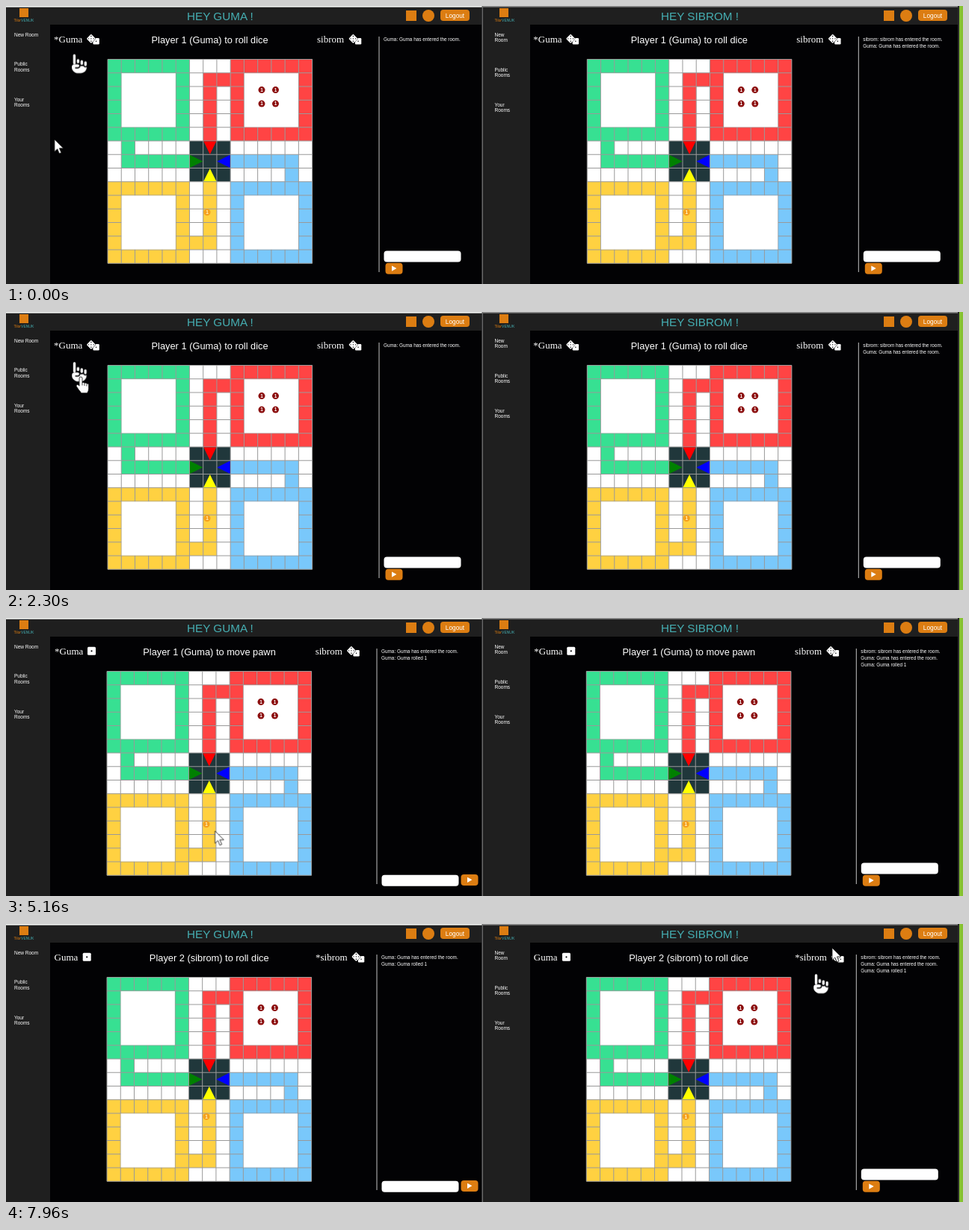
An HTML page for the animation above (8000 ms loop, 1280 by 373 pixels).

```html
<!DOCTYPE html>
<html lang="en">
<head>
<meta charset="utf-8">
<title>Board game in two windows</title>
<style>
html, body { margin: 0; width: 100%; height: 100%; overflow: hidden; background: #020204; }
svg { display: block; width: 1280px; height: 373px; font-family: Arial, "Liberation Sans", sans-serif; }
text { fill: #fff; white-space: pre; }
.teal { fill: #45aeb2; font-size: 15.25px; }
.menu { font-size: 6.5px; }
.log { font-size: 6.4px; }
.status { font-size: 12.83px; text-anchor: middle; }
.name { font: 13px "Times New Roman", "Liberation Serif", serif; }
.button { font-size: 8.3px; text-anchor: middle; }
.pip { font-size: 6.5px; font-weight: bold; text-anchor: middle; }

.roll, .move, .next, .news, .arrow, .finger { animation: 8s step-end infinite; }
.roll { animation-name: roll; }
.move { animation-name: move; }
.next { animation-name: next; }
.news { animation-name: news; }
.arrow { animation-name: arrow; }
.finger { animation-name: finger; }
@keyframes roll { 0% { opacity: 1 } 30.9%, 100% { opacity: 0 } }
@keyframes move { 0% { opacity: 0 } 30.9% { opacity: 1 } 87%, 100% { opacity: 0 } }
@keyframes next { 0% { opacity: 0 } 87%, 100% { opacity: 1 } }
@keyframes news { 0% { opacity: 0 } 31.7%, 100% { opacity: 1 } }
@keyframes arrow { 0% { opacity: 1 } 8.75% { opacity: 0 } 30.9% { opacity: 1 } 80.6% { opacity: 0 } 87.2%, 100% { opacity: 1 } }
@keyframes finger { 0% { opacity: 0 } 8.75% { opacity: 1 } 30.9% { opacity: 0 } 80.6% { opacity: 1 } 87.2%, 100% { opacity: 0 } }

.bounce { animation: bounce 1s cubic-bezier(.28, .84, .42, 1) -.371s infinite; }
.next .bounce { animation-delay: -.04s; }
@keyframes bounce {
  0%, 64%, 100% { transform: scale(1, 1) translateY(0) }
  10% { transform: scale(1.1, .9) translateY(0) }
  30% { transform: scale(.9, 1.1) translateY(-13px) }
  50% { transform: scale(1.05, .95) translateY(0) }
  57% { transform: scale(1, 1) translateY(-3.25px) }
}
.mouse { animation: mouse 8s linear infinite; }
@keyframes mouse {
  0% { transform: translate(65px, 179px) }
  2.8% { transform: translate(28px, 165px) }
  4.5% { transform: translate(2px, 145px) }
  6.5% { transform: translate(28px, 118px) }
  8.75% { transform: translate(85px, 86px) }
  10.4%, 14% { transform: translate(109px, 75px) }
  19.5%, 31.6% { transform: translate(100px, 87px) }
  37%, 40% { transform: translate(128px, 96px) }
  41.6% { transform: translate(275px, 308px) }
  43.5% { transform: translate(400px, 350px) }
  46% { transform: translate(600px, 362px) }
  49% { transform: translate(790px, 290px) }
  51.6%, 52.9% { transform: translate(845px, 221px) }
  56.25% { transform: translate(828px, 238px) }
  58.5% { transform: translate(720px, 335px) }
  60.5% { transform: translate(540px, 362px) }
  62.9% { transform: translate(287px, 292px) }
  67% { transform: translate(268px, 276px) }
  70% { transform: translate(261px, 270px) }
  73.2%, 77% { transform: translate(264px, 276px) }
  80.6%, 87.2% { transform: translate(264px, 278px) }
  90% { transform: translate(310px, 312px) }
  94% { transform: translate(620px, 298px) }
  97.2% { transform: translate(880px, 217px) }
  99.5%, 100% { transform: translate(1105px, 32px) }
}
</style>
</head>
<body>
<svg id="stage" viewBox="0 0 1280 373"></svg>
<script>
const ORANGE = '#dc7d12', CELL = 18.24;
const ONE = 'Guma', TWO = 'sibrom';

const rect = (x, y, w, h, fill, r = 0) =>
  `<rect x="${x}" y="${y}" width="${w}" height="${h}" rx="${r}" fill="${fill}"/>`;
const disc = (x, y, r, fill) => `<circle cx="${x}" cy="${y}" r="${r}" fill="${fill}"/>`;
const text = (x, y, cls, s) => `<text x="${x}" y="${y}" class="${cls}">${s}</text>`;
const path = (d, fill, more = '') => `<path d="${d}" fill="${fill}" ${more}/>`;
const group = (x, y, body, cls = '') => `<g class="${cls}" transform="translate(${x} ${y})">${body}</g>`;
const use = (id, x, y) => `<use href="#${id}" x="${x}" y="${y}"/>`;

const pawn = (x, y, fill, ink) => disc(x, y, 4.5, fill) +
  `<text x="${x}" y="${y + 2.3}" class="pip" style="fill:${ink}">1</text>`;

// Board in cell units: coloured blocks, grid, homes, goal triangles
function board() {
  const [g, r, b, y] = ['#37e092', '#ff4444', '#79c8fb', '#ffd141'];
  const blocks = [
    [0, 0, 6, 6, g], [1, 6, 1, 2, g], [2, 7, 4, 1, g],
    [9, 0, 6, 6, r], [7, 1, 2, 1, r], [7, 2, 1, 4, r],
    [9, 9, 6, 6, b], [9, 7, 5, 1, b], [13, 8, 1, 1, b],
    [0, 9, 6, 6, y], [7, 9, 1, 5, y], [6, 13, 1, 1, y],
    [6, 6, 3, 3, '#20373b']
  ];
  let lines = '';
  for (let i = 0; i <= 15; i++) lines += `M${i} 0V15M0 ${i}H15`;
  const homes = [[1, 1], [10, 1], [1, 10], [10, 10]];
  const cells = rect(0, 0, 15, 15, '#fff') +
    blocks.map(k => rect(...k)).join('') +
    path(lines, 'none', 'stroke="#999" stroke-width=".055"') +
    homes.map(([x, y]) => rect(x + .02, y + .02, 3.96, 3.96, '#fff')).join('') +
    path('M7.03 6.03h.94L7.5 6.98z', 'red') + path('M6.03 7.03v.94L6.98 7.5z', 'green') +
    path('M8.97 7.03v.94L8.02 7.5z', 'blue') + path('M7.03 8.97h.94L7.5 8.02z', 'yellow');
  let pawns = '';
  for (const x of [206, 224.5]) for (const y of [41, 59.5]) pawns += pawn(x, y, '#8b0d0d', '#fff');
  return `<g id="board"><g transform="scale(${CELL})">${cells}</g>${pawns}</g>`;
}

function dice() {
  const dots = [[96, 224], [224, 96], [224, 224], [224, 352], [352, 224], [480, 352]];
  return `<g id="dice"><g transform="scale(.0262)">${rect(320, 192, 320, 320, '#fff', 48)}
    <rect x="56" y="56" width="336" height="336" rx="50" transform="rotate(45 224 224)" fill="#fff" stroke="#020204" stroke-width="34" paint-order="stroke"/>
    ${dots.map(([x, y]) => disc(x, y, 28, '#020204')).join('')}</g></g>`;
}

const rolled = `<g id="rolled">${rect(0, 0, 11, 11, '#fff', 1.5)}${disc(5.5, 5.5, 1.1, '#020204')}</g>`;

const pointer = `<g id="pointer"><g transform="scale(.0508) translate(-192 -256)" fill="#fff">
  <path d="M64 32V240" stroke="#fff" stroke-width="64" stroke-linecap="round"/>
  <path d="M160 160v48M256 192v64M352 224v64" stroke="#fff" stroke-width="64" stroke-linecap="round"/>
  <path d="M224 312v-.6c9.4 5.4 20.3 8.6 32 8.6 13.2 0 25.4-4 35.6-10.8 8.7 24.9 32.5 42.8 60.4 42.8 11.7 0 22.6-3.1 32-8.6V352c0 88.4-71.6 160-160 160h-61.7c-42.4 0-83.1-16.9-113.1-46.9L37.5 453.5C13.5 429.5 0 396.9 0 363v-27c0-35.3 28.7-64 64-64h88c22.1 0 40 17.9 40 40s-17.9 40-40 40H96c-8.8 0-16 7.2-16 16s7.2 16 16 16h56c39.8 0 72-32.2 72-72z"/>
</g></g>`;
const hint = (x, y) => group(x, y, `<g class="bounce">${use('pointer', 0, 0)}</g>`);

const send = (x, y) => rect(x, y, 23, 15, ORANGE, 4) + path(`M${x + 8.5} ${y + 3.7}v7.2l6.4-3.6z`, '#fff');
const input = (x, y) => rect(x, y, 103, 15, '#fff', 4);

const menu = (x, rows) => rows.map(([y, s]) => text(x, y, 'menu', s)).join('');

// Header and sidebar of one window
function frame(x, titleX, title, toolX, rows) {
  return rect(x, 0, 636, 25, '#1f1f1f') + rect(x, 25, x ? 63 : 59, 348, '#1f1f1f') +
    rect(x + (x ? 22 : 18), 3, 12, 12, ORANGE) +
    `<text x="${x + (x ? 15.5 : 10.5)}" y="21" font-size="5px"><tspan fill="${ORANGE}">Tilor</tspan><tspan fill="#45aeb2">VENUK</tspan></text>` +
    text(titleX, 18.5, 'teal', title) +
    rect(toolX, 6, 14, 14, ORANGE) + disc(toolX + 30, 13, 8, ORANGE) +
    rect(toolX + 46, 5, 39, 15, ORANGE, 4) + text(toolX + 65.5, 15.6, 'button', 'Logout') +
    menu(x ? 653.5 : 11, rows);
}

// Changing part of one window, in the left window's coordinates
function scene(s, right) {
  const log = [`${ONE}: ${ONE} has entered the room.`];
  if (right) log.unshift(`${TWO}: ${TWO} has entered the room.`);
  const line = (m, i) => text(s.chat + 6.5, 47 + 9 * i, 'log', m);
  const wide = right || !s.roll;
  return use('board', s.board, 71.6) +
    pawn(s.board + 133, s.pawn, '#f5a01c', '#fff3c4') +
    text(s.one[0], 49, 'name', s.one[1]) + text(s.two[0], 49, 'name', s.two[1]) +
    (s.roll ? use('rolled', s.one[2], 38.8) : use('dice', s.one[2], 38)) +
    use('dice', s.two[2], 38) +
    text(s.mid, 49.5, 'status', s.status) +
    rect(s.chat, 41, 1, 316, '#c4c4c4') +
    log.map(line).join('') +
    (s.roll ? `<g class="news">${line(`${ONE}: ${ONE} rolled 1`, log.length)}</g>` : '') +
    (wide ? input(s.chat + 7, 328.5) + send(s.chat + 9, 344.8)
          : input(s.chat + 7, 344.8) + send(s.chat + 113, 344));
}

const scenes = [
  { cls: 'roll', board: 136, pawn: 276.7, one: [64, '*' + ONE, 108], two: [416, TWO, 458.5],
    mid: 272.6, status: `Player 1 (${ONE}) to roll dice`, chat: 498.5 },
  { cls: 'move', roll: 1, board: 135, pawn: 276.7, one: [65, '*' + ONE, 109], two: [413.7, TWO, 456],
    mid: 272, status: `Player 1 (${ONE}) to move pawn`, chat: 495.5 },
  { cls: 'next', roll: 1, board: 135, pawn: 258.4, one: [64.5, ONE, 102.7], two: [414, '*' + TWO, 462.5],
    mid: 271.7, status: `Player 2 (${TWO}) to roll dice`, chat: 495.5 }
];

const hints = { roll: hint(98, 80.2), next: hint(1090, 80.2), move: '' };
const windows = scenes.map(s =>
  `<g class="${s.cls}">${scene(s, false)}${group(641.3, 0, scene(s, true))}${hints[s.cls]}</g>`).join('');

const mouse = `<g class="mouse" stroke="#111" stroke-width=".8">
  ${path('M0 0V16.5l3.8-3.6 2.6 6.2 2.7-1.1-2.6-6.1h5.3z', '#fff', 'class="arrow"')}
  <g class="finger">${path('M-2 2a2 2 0 0 1 4 0v6a1.8 1.8 0 0 1 3 .6a1.8 1.8 0 0 1 3 .8a1.6 1.6 0 0 1 2.6 1.4v5q0 3-2 6h-8q-1-2-3-4l-3.4-5a1.7 1.7 0 0 1 2.6-2l1.2 1.4z', '#fff')}
  ${path('M2 8v3.5M5 9v3M8 10v2.5', 'none')}</g></g>`;

document.getElementById('stage').innerHTML =
  `<defs>${board()}${dice()}${rolled}${pointer}</defs>` +
  rect(0, 0, 1280, 373, '#020204') +
  frame(0, 242, `HEY ${ONE.toUpperCase()} !`, 535,
    [[40.5, 'New Room'], [80.3, 'Public'], [87.5, 'Rooms'], [127.5, 'Your'], [134.7, 'Rooms']]) +
  frame(638, 876, `HEY ${TWO.toUpperCase()} !`, 1174,
    [[40.8, 'New'], [48, 'Room'], [88, 'Public'], [95, 'Rooms'], [135, 'Your'], [142.3, 'Rooms']]) +
  windows +
  rect(0, 0, 637, 1.6, '#f4f6f4') + rect(637, 0, 637, 1.6, '#8a8a8a') +
  rect(636.5, 0, 1.5, 373, '#6a6a6a') +
  rect(1273, 0, 2, 373, '#2a2a2a') + rect(1275, 0, 5, 373, '#86c232') +
  mouse;
</script>
</body>
</html>
```
